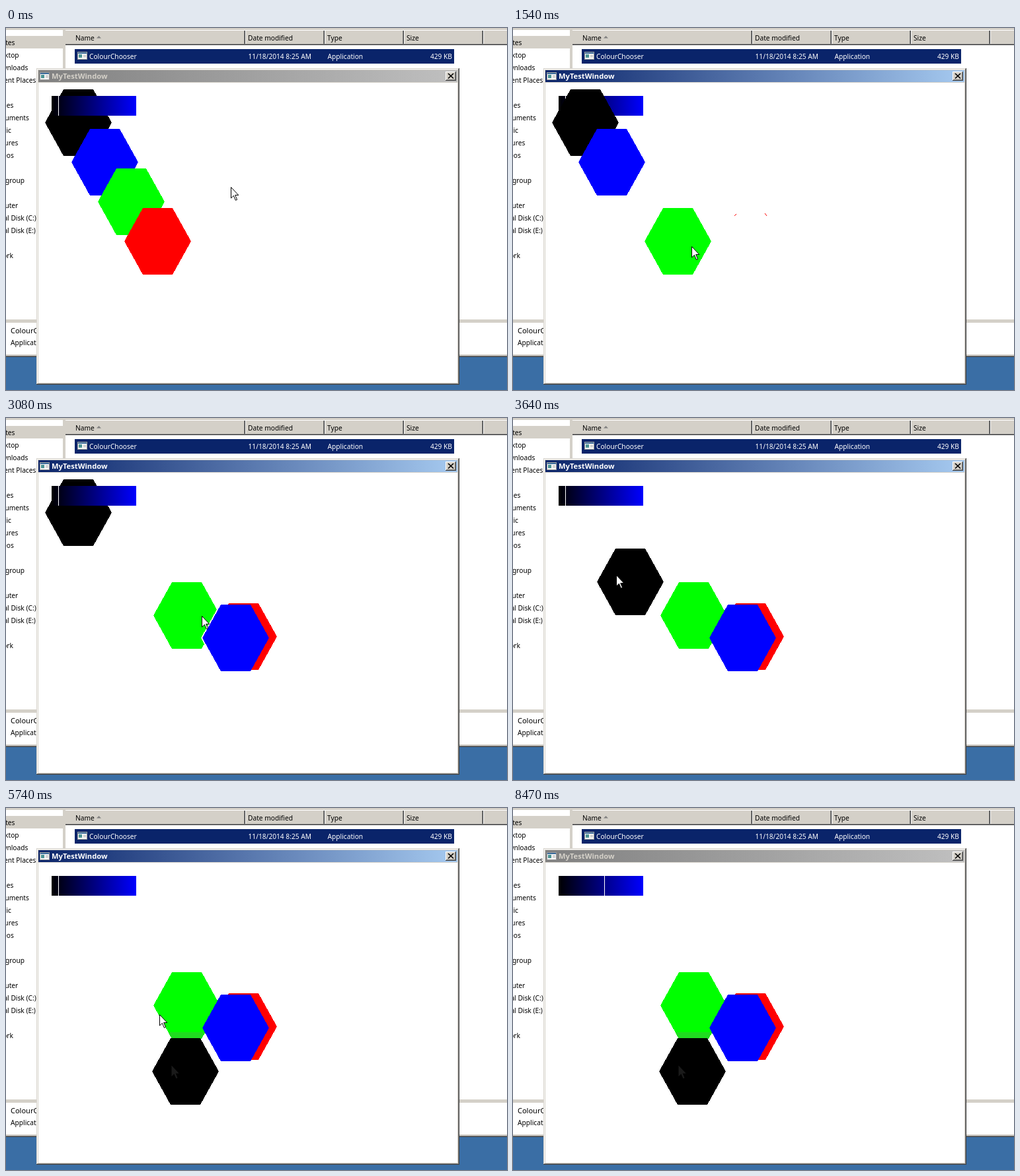
Recreate the animation shown at these times as an HTML page. Size 758 px wide and 549 px high, loop 8.54 s.

```html
<!DOCTYPE html>
<html lang="en">
<head>
<meta charset="utf-8">
<title>MyTestWindow</title>
<style>
  html, body { margin: 0; width: 100%; height: 100%; overflow: hidden; background: #3a6ea5; }
  svg { display: block; }
  text { font: 10.2px "Noto Sans", "Open Sans", sans-serif; white-space: pre; }
  .title { font-size: 11.2px; font-weight: bold; }
  .end { text-anchor: end; }
  .crisp { shape-rendering: crispEdges; }
</style>
</head>
<body>
<svg width="758" height="549" viewBox="0 0 758 549">
  <defs>
    <linearGradient id="active"><stop stop-color="#0a246a"/><stop offset="1" stop-color="#a6caf0"/></linearGradient>
    <linearGradient id="inactive"><stop stop-color="#808080"/><stop offset="1" stop-color="#c0c0c0"/></linearGradient>
    <linearGradient id="ramp"><stop/><stop offset="1" stop-color="#00f"/></linearGradient>
    <path id="hex" class="crisp" d="M0 50.5L28 0H73L101 50.5L73 101H28z"/>
    <path id="arrow" d="M.5 .5V17L4.4 13.3L7.4 20.3L9.6 19.3L6.7 12.5H11.8z"/>
    <g id="icon" class="crisp">
      <path fill="#f4f4f4" stroke="#9a9a9a" d="M.5 .5H14.5V11.5H.5z"/>
      <path fill="#3c6c9c" d="M1 1H14V3H1z"/>
      <path fill="#4a9494" d="M2 4H7V9H2z"/>
      <path fill="#b4b4b4" d="M9 5H13V6H9zM9 7H13V8H9z"/>
    </g>
  </defs>

  <!-- file browser -->
  <g class="crisp">
    <path fill="#d4d0c8" d="M0 0H758V498H0z"/>
    <path fill="#fff" d="M0 3H86V442H0zM90 26H758V442H90zM0 447H758V495H0z"/>
    <path fill="#d4d0c8" d="M0 12H86V31H0z"/>
    <path fill="#fff" d="M90 3H758V4H90z"/>
    <path fill="#404040" d="M90 25H758V26H90zM0 498H758V499H0z"/>
    <path fill="#808080" d="M90 24H758V25H90zM0 497H758V498H0z"/>
    <path fill="#0a246a" d="M104 32H678V54H104z"/>
    <g id="columns"></g>
  </g>
  <path fill="#808080" d="M137 15.5L140.5 12L144 15.5z"/>
  <use href="#icon" x="108" y="36"/>
  <g id="labels"></g>

  <!-- test window -->
  <g class="crisp">
    <path fill="#404040" d="M46 61H686V541H46z"/>
    <path fill="#d4d0c8" d="M46 61H685V540H46z"/>
    <path fill="#808080" d="M47 62H685V540H47z"/>
    <path fill="#fff" d="M47 62H684V539H47z"/>
    <path fill="#d4d0c8" d="M48 63H684V539H48z"/>
    <path fill="#fff" d="M49 83H683V538H49z"/>
    <path fill="url(#inactive)" d="M49 64H683V82H49z"/>
  </g>
  <text class="title" x="69" y="77" fill="#d4d0c8">MyTestWindow</text>
  <g id="focus">
    <path class="crisp" fill="url(#active)" d="M49 64H683V82H49z"/>
    <text class="title" x="69" y="77" fill="#fff">MyTestWindow</text>
  </g>
  <use href="#icon" x="51" y="67"/>
  <g class="crisp">
    <path fill="#404040" d="M665 66H681V80H665z"/>
    <path fill="#fff" d="M665 66H680V79H665z"/>
    <path fill="#808080" d="M666 67H680V79H666z"/>
    <path fill="#d4d0c8" d="M666 67H679V78H666z"/>
  </g>
  <path stroke="#000" stroke-width="1.7" d="M669 69L677 76.5M677 69L669 76.5"/>

  <g id="resting"></g>
  <g id="moved"></g>
  <path class="crisp" fill="url(#ramp)" d="M69 103H197V133H69z"/>
  <path id="marker" class="crisp" fill="#fff" d="M0 103H1V133H0z"/>
  <g id="flicker">
    <path class="crisp" d="M65 133L87 93H132L154 133z"/>
    <path fill="none" stroke="#f00" d="M335 285L338 282M381 281L384 285"/>
  </g>
  <use id="pointer" href="#arrow" fill="#fff" stroke="#000"/>
</svg>

<script>
const LOOP = 8540, STEP = 70, FLICKER = 1540;
const $ = id => document.getElementById(id);

function add(parent, tag, attrs, text = '') {
  const el = document.createElementNS('http://www.w3.org/2000/svg', tag);
  for (const key in attrs) el.setAttribute(key, attrs[key]);
  el.textContent = text;
  return parent.appendChild(el);
}

// pointer glides: start ms, end ms, destination; it rests in between
const swings = [166, 116, 168].map((x, i) => [6370 + 280 * i, 6580 + 280 * i, x, 120 + 2 * i]);
const glides = [
  [420, 700, 230, 318], [700, 1050, 360, 326],
  [1050, 1400, 210, 271], [1400, 1540, 270, 331], [1540, 1680, 299, 312], [1960, 2100, 294, 307],
  [2310, 2590, 140, 203], [2590, 2870, 338, 333],
  [3010, 3430, 88, 133], [3430, 3920, 246, 379], [4060, 4270, 252, 391], [5180, 5250, 250, 389],
  [5670, 5740, 232, 313], [5740, 6160, 98, 113],
  ...swings, [7210, 7560, 138, 123],
  [7560, 7840, 256, 264], [7840, 8260, 700, 570]
];

const clamp = (t, from, to) => Math.min(Math.max(t, from), to);

function pointerAt(t) {
  let x = 340, y = 241;
  for (const [start, end, toX, toY] of glides) {
    const k = clamp((t - start) / (end - start), 0, 1);
    x += (toX - x) * k;
    y += (toY - y) * k;
  }
  return [Math.round(x), Math.round(y)];
}

function play(el, styleAt) {
  const frames = [];
  for (let t = 0; t <= LOOP; t += STEP)
    frames.push({ offset: t / LOOP, easing: 'step-end', ...styleAt(t) });
  el.animate(frames, { duration: LOOP, iterations: Infinity });
}

const move = (x, y) => ({ transform: `translate(${x}px, ${y}px)` });
const show = (el, from, to = LOOP + 1) =>
  play(el, t => ({ opacity: t >= from && t < to ? 1 : 0 }));

// back to front; halo is the erased edge left behind until the next repaint
const hexes = [
  { fill: '#000', pick: 3430, drop: 5250, repaint: 5250, halo: [0, -2] },
  { fill: '#00f', pick: 2590, drop: 2870, repaint: 3430, halo: [-2, 0] },
  { fill: '#0f0', pick: 1400, drop: 2100, repaint: 2310, halo: [-2, 0] },
  { fill: '#f00', pick: 700, drop: 1050, repaint: 1050, halo: [-2, 0] }
].map((hex, i) => ({ ...hex, x: 59 + 40 * i, y: 93 + 60 * i }));
const [black, , green, red] = hexes;

for (const { fill, x, y, pick } of hexes)
  show(add($('resting'), 'use', { href: '#hex', x, y, fill }), 0, pick);

for (const hex of [...hexes].reverse()) {
  const { fill, x, y, pick, drop, repaint, halo } = hex;
  const group = hex.group = add($('moved'), 'g', {});
  const [grabX, grabY] = pointerAt(pick);
  play(group, t => {
    const [px, py] = pointerAt(clamp(t, pick, drop));
    const hidden = t < pick || (hex === red && t === FLICKER);
    return { ...move(x + px - grabX, y + py - grabY), opacity: hidden ? 0 : 1 };
  });
  show(add(group, 'use', { href: '#hex', x: halo[0], y: halo[1], fill: '#fff' }), pick, repaint);
  add(group, 'use', { href: '#hex', fill });
}

// marks that stay after the last drop
show(add(green.group, 'path', { d: 'M23 91H77L73 101H28z', fill: '#20dc20' }), black.drop);
show(add(black.group, 'use', { href: '#arrow', x: 29, y: 41, fill: '#1a1a1a' }), black.drop);

show($('focus'), red.pick, 8470);
show($('flicker'), FLICKER, FLICKER + STEP);
play($('pointer'), t => move(...pointerAt(t)));
play($('marker'), t => move(t < 6300 ? 79 : pointerAt(clamp(t, 6300, 7560))[0], 0));

// static text
const label = (x, y, text, attrs) => add($('labels'), 'text', { x, y, ...attrs }, text);
const white = { fill: '#fff' };

const sidebar = `Favorites
 Desktop
 Downloads
 Recent Places

Libraries
 Documents
 Music
 Pictures
 Videos

Homegroup

Computer
 Local Disk (C:)
 Local Disk (E:)

Network`;
sidebar.split('\n').forEach((line, i) =>
  label(line.startsWith(' ') ? -20 : -30, 26 + 19 * i, line.trim()));

label(105, 19, 'Name');
label(126, 47, 'ColourChooser', white);
label(675, 47, '429 KB', { ...white, class: 'end' });
label(7, 463, 'ColourChooser', { style: 'font-size: 11px' });
label(7, 481, 'Application');

const columns = [['Date modified', '11/18/2014 8:25 AM'], ['Type', 'Application'], ['Size', ''], ['', '']];
columns.forEach(([head, cell], i) => {
  const x = 361 + 120 * i;
  label(x + 5, 19, head);
  label(x + 5.5, 47, cell, white);
  ['#808080', '#404040', '#fff'].forEach((fill, j) =>
    add($('columns'), 'rect', { x: x - 1 + j, y: 4, width: 1, height: 20, fill }));
});
</script>
</body>
</html>
```
